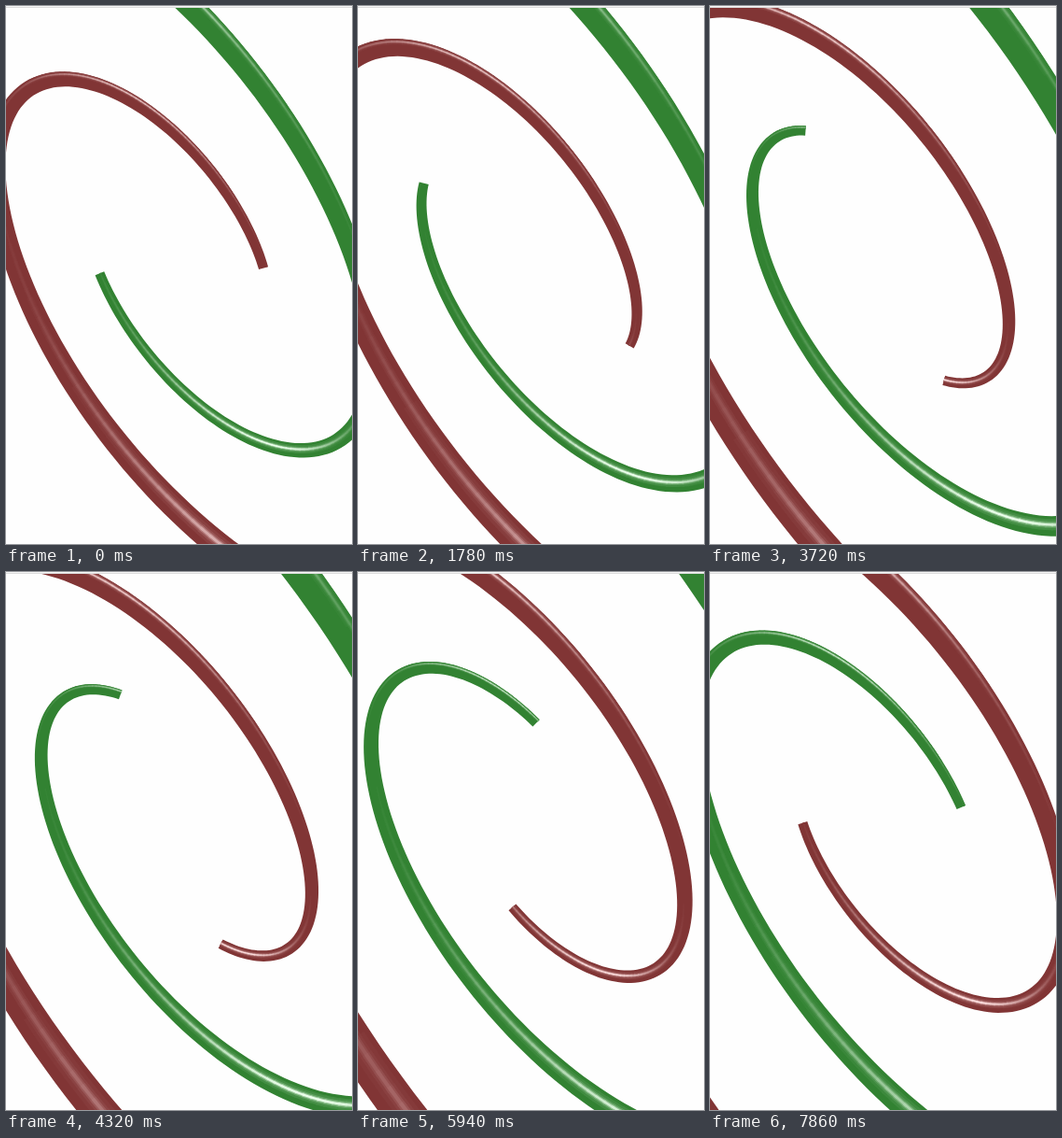
These frames come from a looping animation (371x576 px, 8 s). An HTML page with a canvas:

```html
<!DOCTYPE html>
<html lang="en">
<head>
<meta charset="utf-8">
<title>Rotating spirals</title>
<style>
html, body { margin: 0; width: 371px; height: 576px; overflow: hidden; background: #fefefe; }
canvas { display: block; }
</style>
</head>
<body>
<canvas id="stage" width="371" height="576"></canvas>
<script>
const ctx = document.getElementById('stage').getContext('2d');
const RAD = Math.PI / 180;
const LOOP = 8000, STEP = 148.5, TURN = 3.353;
const CENTER = [186.5, 272], U = [-174, 6], V = [-133, -274];
const GROWTH = 0.004, TRAIL = 480, GAP = 2, TUBE = 5.2;

const ARMS = [
  { angle: 185, radius: 0.477, base: [129, 53, 53], shine: [255, 225, 225] },
  { angle: -4.4, radius: 0.521, base: [50, 130, 50], shine: [235, 255, 235] }
];
// Highlight bands from wide and faint to narrow and bright: width, strength
const BANDS = [[0.56, 0.1], [0.34, 0.26], [0.2, 0.6], [0.1, 1]];

const bell = (d, w) => Math.exp(-d * d / (w * w));
const rgb = c => `rgb(${c.map(Math.round)})`;
const mix = (a, b, k) => rgb(a.map((v, i) => v + (b[i] - v) * k));

// A logarithmic spiral in a tilted plane, slightly flattened
function place(arm, turn, s) {
  const phi = arm.angle + turn - s;
  const flat = 1 + 0.018 * Math.cos(2 * (phi - 20) * RAD);
  const r = arm.radius * Math.exp(GROWTH * s) * flat;
  const p = r * Math.cos(phi * RAD), q = r * Math.sin(phi * RAD);
  return {
    phi,
    x: CENTER[0] + p * U[0] + q * V[0],
    y: CENTER[1] + p * U[1] + q * V[1]
  };
}

function sample(arm, turn, s) {
  const pt = place(arm, turn, s);
  const a = place(arm, turn, s - 0.5), b = place(arm, turn, s + 0.5);
  const len = Math.hypot(b.x - a.x, b.y - a.y);
  pt.nx = (a.y - b.y) / len;
  pt.ny = (b.x - a.x) / len;
  pt.half = TUBE * Math.exp(GROWTH * s);
  return pt;
}

const shift = (pt, k) => [pt.x + pt.nx * pt.half * k, pt.y + pt.ny * pt.half * k];

// The light catches the outer rim at the top and the middle of the tube below
function light(phi) {
  const a = ((phi + 160) % 360 + 360) % 360 - 160;
  if (a > 20) return { power: 0.85 * bell(a - 108, 40), offset: 0.66, size: 0.55 };
  const d = a + 90;
  return { power: bell(d, d > 0 ? 52 : 32), offset: -0.15, size: 1 };
}

function drawArm(arm, turn) {
  const pts = [];
  for (let s = 0; s <= TRAIL; s += GAP) pts.push(sample(arm, turn, s));

  ctx.beginPath();
  pts.forEach(p => ctx.lineTo(...shift(p, 1)));
  [...pts].reverse().forEach(p => ctx.lineTo(...shift(p, -1)));
  ctx.fillStyle = rgb(arm.base);
  ctx.fill();

  for (const [width, strength] of BANDS) {
    for (let i = 0; i < pts.length - 2; i++) {
      const p = pts[i], { power, offset, size } = light(p.phi);
      if (power * strength < 0.02) continue;
      const from = shift(p, offset), mid = shift(pts[i + 1], offset), next = shift(pts[i + 2], offset);
      ctx.beginPath();
      ctx.moveTo(...from);
      ctx.lineTo(...mid);
      ctx.lineTo(mid[0] + (next[0] - mid[0]) * 0.3, mid[1] + (next[1] - mid[1]) * 0.3);
      ctx.lineWidth = 2 * p.half * width * size;
      ctx.strokeStyle = mix(arm.base, arm.shine, power * strength);
      ctx.stroke();
    }
  }
}

function draw() {
  const t = performance.now() % LOOP;
  let k = Math.floor((t + 14) / STEP);
  if (k === 13) k = 12; // one pose is held twice as long
  ctx.fillStyle = '#fefefe';
  ctx.fillRect(0, 0, 371, 576);
  ARMS.forEach(arm => drawArm(arm, k * TURN));
  ctx.fillStyle = '#f6f6f6';
  ctx.fillRect(0, 0, 371, 1);
  ctx.fillStyle = '#dcdcdc';
  ctx.fillRect(0, 1, 371, 1);
  requestAnimationFrame(draw);
}
draw();
</script>
</body>
</html>
```
